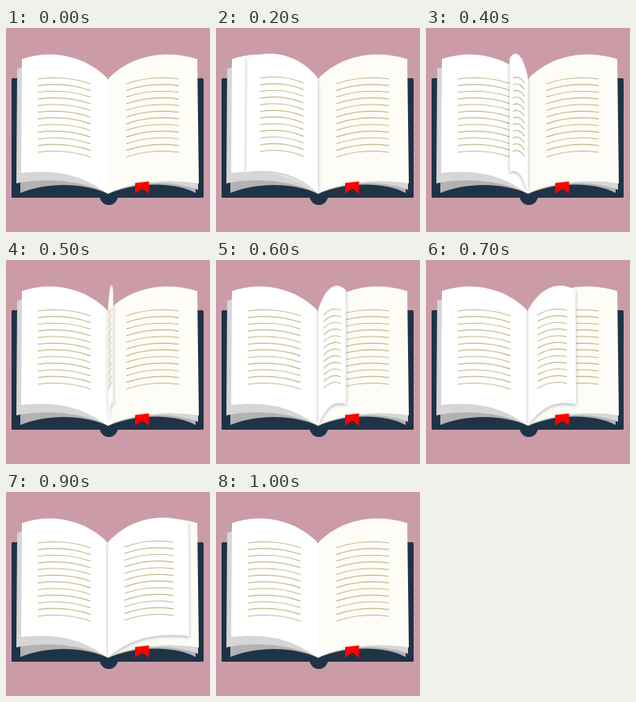
An HTML page without scripts that plays this animation: 256x256 px, repeating every 1.1 s.

```html
<!DOCTYPE html>
<html lang="en">
<head>
<meta charset="utf-8">
<title>Turning page</title>
<style>
  html, body { margin: 0; width: 100%; height: 100%; overflow: hidden; background: #cb9ca8; }
  svg { display: block; width: 100vw; height: 100vh; }
  .turn {
    transform-origin: 128px 0;
    animation: turn 1.1s step-end infinite;
  }
  @keyframes turn {
    0%     { opacity: 0; transform: translateY(-1px) scaleX(1); }
    18.18% { opacity: 1; transform: translateY(-1px) scaleX(.825); }
    27.27% { opacity: 1; transform: translateY(-1px) scaleX(.593); }
    36.36% { opacity: 1; transform: translateY(-1px) scaleX(.213); }
    45.45% { opacity: 1; transform: translateY(-1px) scaleX(-.06); }
    54.54% { opacity: 1; transform: translateY(-1px) scaleX(-.324); }
    63.63% { opacity: 1; transform: translateY(-1px) scaleX(-.555); }
    72.72% { opacity: 1; transform: translateY(-1px) scaleX(-.778); }
    81.81% { opacity: 1; transform: translateY(-1px) scaleX(-.935); }
    90.9%, 100% { opacity: 0; transform: translateY(-1px) scaleX(-1); }
  }
</style>
</head>
<body>
<svg viewBox="0 0 256 256">
  <defs>
    <path id="left" d="M20 39C57 26 101 35 128 64V208C100 188 70 176 19 182Z"/>
    <path id="right" d="M128 64C155 35 199 26 240 39L242 195C200 188 150 195 128 208Z"/>
    <path id="line" d="M40 64C62 61 86 63 106 70" fill="none" stroke="#c2b988" stroke-width="1.15" vector-effect="non-scaling-stroke"/>
    <g id="three">
      <use href="#line"/>
      <use href="#line" y="8.36"/>
      <use href="#line" y="16.72"/>
    </g>
    <g id="text">
      <use href="#three"/>
      <use href="#three" y="25.08"/>
      <use href="#three" y="50.16"/>
      <use href="#three" y="75.24"/>
    </g>
    <clipPath id="pages">
      <use href="#left"/>
      <use href="#right"/>
    </clipPath>
    <filter id="soft" filterUnits="userSpaceOnUse" x="0" y="0" width="256" height="256">
      <feGaussianBlur stdDeviation="2"/>
    </filter>
  </defs>

  <!-- cover and spine -->
  <g fill="#1f3346">
    <rect x="7" y="63" width="241" height="150" rx="1.5"/>
    <circle cx="129" cy="210.5" r="11.5"/>
  </g>

  <!-- page stacks -->
  <g fill="#b2b2b2">
    <path d="M18 185V207C50 194 95 193 128 208V185Z"/>
    <path d="M128 185H238V207C210 193 165 193 128 208Z"/>
  </g>
  <g fill="#d6d6d6">
    <path d="M14 51L22 49L128 64V208C100 192 50 187 13 195Z"/>
    <path d="M128 185H241V203C205 190 160 193 128 208Z"/>
  </g>

  <!-- open pages -->
  <use href="#left" fill="#fff"/>
  <use href="#text"/>
  <use href="#right" fill="#fdfcf6"/>
  <use href="#text" transform="translate(257) scale(-1 1)"/>
  <path d="M162 194.5L179.500 192.500V208L171 201.500L162 208Z" fill="#f00"/>

  <!-- turning page -->
  <g clip-path="url(#pages)">
    <g filter="url(#soft)" opacity=".3">
      <g transform="translate(0 1.500)">
        <use class="turn" href="#left"/>
      </g>
    </g>
  </g>
  <g class="turn">
    <use href="#left" fill="#fff"/>
    <use href="#text"/>
  </g>
</svg>
</body>
</html>
```
